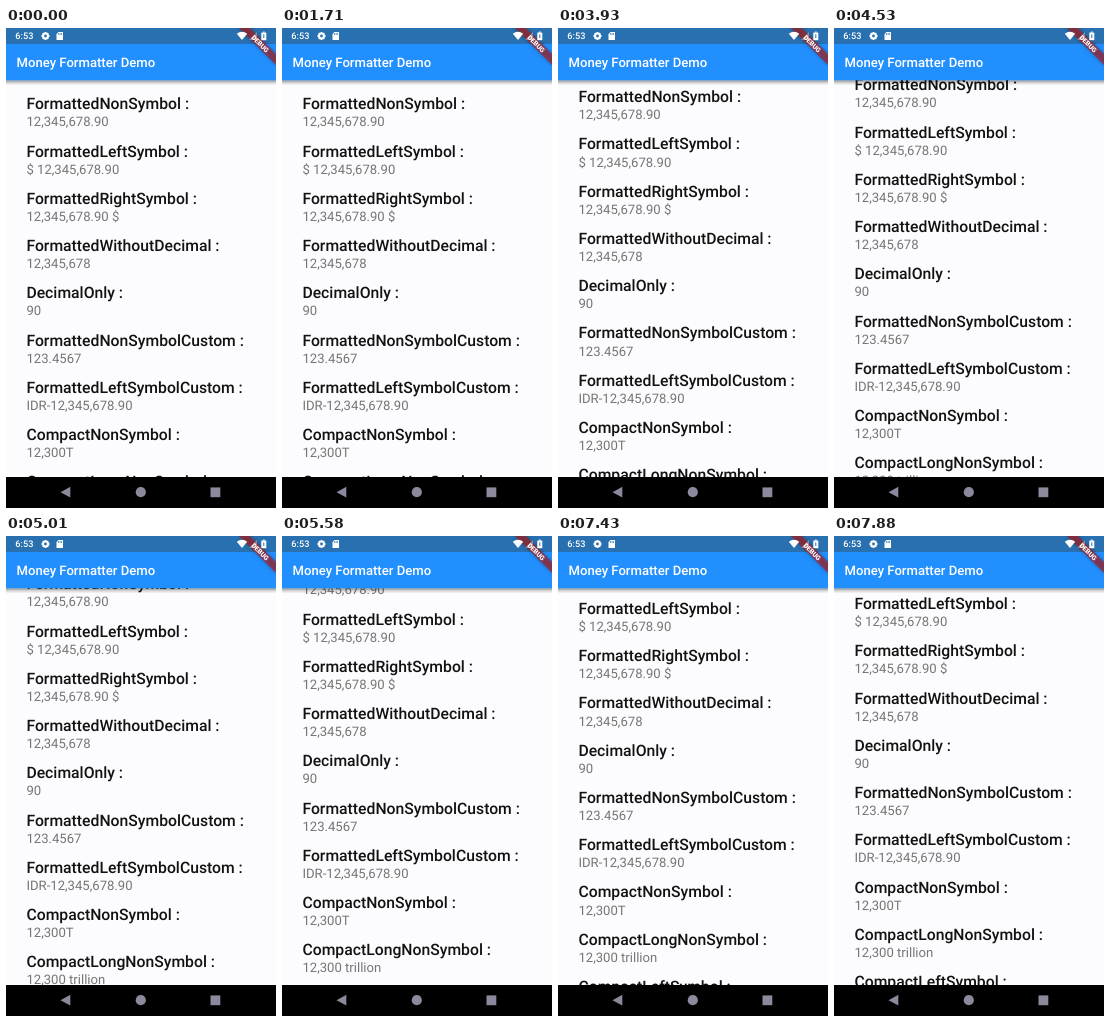
Recreate the animation shown at these times as an HTML page with a canvas. Size 270 px wide and 480 px high, loop 8000 ms.

```html
<!DOCTYPE html>
<html lang="en">
<head>
<meta charset="utf-8">
<title>Money Formatter Demo</title>
<style>
  html, body { margin: 0; width: 100%; height: 100%; overflow: hidden; background: #000; }
  canvas { display: block; width: 270px; height: 480px; }
</style>
</head>
<body>
<canvas id="stage" width="270" height="480"></canvas>
<script>
const ctx = document.getElementById('stage').getContext('2d');
const LOOP = 8000;
const DP = 270 / 411.43;
const STATUS_BOTTOM = 16, BAR_BOTTOM = 52.3, NAV_TOP = 449;
const TEXT_LEFT = 20.4, PITCH = 72 * DP;

const items = [
  ['FormattedNonSymbol', '12,345,678.90'],
  ['FormattedLeftSymbol', '$ 12,345,678.90'],
  ['FormattedRightSymbol', '12,345,678.90 $'],
  ['FormattedWithoutDecimal', '12,345,678'],
  ['DecimalOnly', '90'],
  ['FormattedNonSymbolCustom', '123.4567'],
  ['FormattedLeftSymbolCustom', 'IDR-12,345,678.90'],
  ['CompactNonSymbol', '12,300T'],
  ['CompactLongNonSymbol', '12,300 trillion'],
  ['CompactLeftSymbol', '$ 12,300T'],
];

// Drag segments: start ms, end ms, number of steps, first and last offset
const drags = [
  [3470, 3470, 1, 1, 1],
  [3680, 4480, 13, 3.5, 18],
  [4530, 5050, 8, 19, 29.5],
  [5210, 5580, 5, 32.5, 40],
  [5790, 5790, 1, 42, 42],
  [5960, 5960, 1, 44.7, 44.7],
  [6220, 6220, 1, 46, 46],
  [6390, 6390, 1, 47.3, 47.3],
  [7180, 7180, 1, 48.5, 48.5],
  [7350, 7510, 4, 49.7, 52.5],
  [7720, 7880, 3, 54, 55.5],
];

function scrollAt(t) {
  let offset = 0;
  for (const [start, end, steps, from, to] of drags) {
    if (t < start) break;
    if (steps === 1) { offset = to; continue; }
    const last = steps - 1;
    const step = Math.min(last, Math.floor((t - start) / (end - start) * last + 0.05));
    offset = from + (to - from) * step / last;
  }
  return offset;
}

function rect(x, y, w, h, color) {
  ctx.fillStyle = color;
  ctx.fillRect(x, y, w, h);
}

function text(str, x, y, size, weight, color) {
  ctx.font = `${weight} ${size}px Roboto, sans-serif`;
  ctx.fillStyle = color;
  ctx.fillText(str, x, y);
}

function polygon(color, ...points) {
  ctx.fillStyle = color;
  ctx.beginPath();
  for (const [x, y] of points) ctx.lineTo(x, y);
  ctx.fill();
}

function disc(x, y, r, color) {
  ctx.fillStyle = color;
  ctx.beginPath();
  ctx.arc(x, y, r, 0, Math.PI * 2);
  ctx.fill();
}

function drawList(offset) {
  ctx.save();
  ctx.beginPath();
  ctx.rect(0, 52, 270, NAV_TOP - 52);
  ctx.clip();
  items.forEach(([label, value], i) => {
    const y = i * PITCH - offset;
    text(label + ' :', TEXT_LEFT, 81.3 + y, 24 * DP, 500, '#121212');
    text(value, TEXT_LEFT, 98.4 + y, 20 * DP, 400, '#757575');
  });
  ctx.restore();
}

function drawAppBar() {
  const shade = ctx.createLinearGradient(0, BAR_BOTTOM, 0, 57.5);
  shade.addColorStop(0, 'rgba(0,0,0,.45)');
  shade.addColorStop(0.45, 'rgba(0,0,0,.16)');
  shade.addColorStop(1, 'rgba(0,0,0,0)');
  rect(0, BAR_BOTTOM, 270, 5.2, shade);
  rect(0, 0, 270, BAR_BOTTOM, '#228fff');
  rect(0, 0, 270, STATUS_BOTTOM, '#2870b0');
  text('Money Formatter Demo', 16 * DP, 39, 20 * DP, 500, '#fff');
}

function drawBanner() {
  ctx.save();
  ctx.translate(270, 0);
  ctx.rotate(Math.PI / 4);
  ctx.shadowColor = 'rgba(0,0,0,.5)';
  ctx.shadowBlur = 6 * DP;
  rect(-40 * DP, 28 * DP, 80 * DP, 12 * DP, 'rgba(183,28,28,.63)');
  ctx.shadowColor = 'transparent';
  ctx.textAlign = 'center';
  text('DEBUG', 0, 24.7, 10.2 * DP, 900, '#fff');
  ctx.restore();
}

function drawStatusIcons() {
  text('6:53', 9.3, 11.2, 14 * DP, 500, '#fff');

  ctx.save();
  ctx.translate(39.5, 8);
  for (let i = 0; i < 4; i++) {
    rect(-1, -4, 2, 8, '#fff');
    ctx.rotate(Math.PI / 4);
  }
  ctx.restore();
  disc(39.5, 8, 3.2, '#fff');
  disc(39.5, 8, 1.4, '#2870b0');

  polygon('#fff', [52.5, 4], [57, 4], [57, 12], [50.5, 12], [50.5, 6]);
  for (let i = 0; i < 3; i++) rect(52.2 + i * 1.5, 5.2, 0.8, 1.7, '#2870b0');

  ctx.fillStyle = '#fff';
  ctx.beginPath();
  ctx.moveTo(236, 12);
  ctx.lineTo(230.8, 5.7);
  ctx.quadraticCurveTo(236, 2, 241.2, 5.7);
  ctx.fill();
  polygon('rgba(255,255,255,.35)', [243, 12], [251, 4], [251, 12]);
  rect(255.3, 4.6, 5, 7.6, '#fff');
  rect(256.8, 3.6, 2, 1, '#fff');
  rect(257.3, 6.4, 1, 3.6, '#2870b0');
}

function drawNavBar() {
  const gray = '#8a8a9c';
  rect(0, NAV_TOP, 270, 480 - NAV_TOP, '#000');
  polygon(gray, [54.5, 464.2], [64.3, 458.8], [64.3, 469.6]);
  disc(134.8, 464.2, 5.1, gray);
  rect(204.5, 459.4, 9.8, 9.8, gray);
}

function draw(t) {
  rect(0, 0, 270, 480, '#fcfcfe');
  drawList(scrollAt(t));
  drawAppBar();
  drawBanner();
  drawStatusIcons();
  drawNavBar();
}

ctx.textRendering = 'geometricPrecision';
const started = performance.now();
function tick() {
  draw((performance.now() - started) % LOOP);
  requestAnimationFrame(tick);
}
tick();
</script>
</body>
</html>
```
